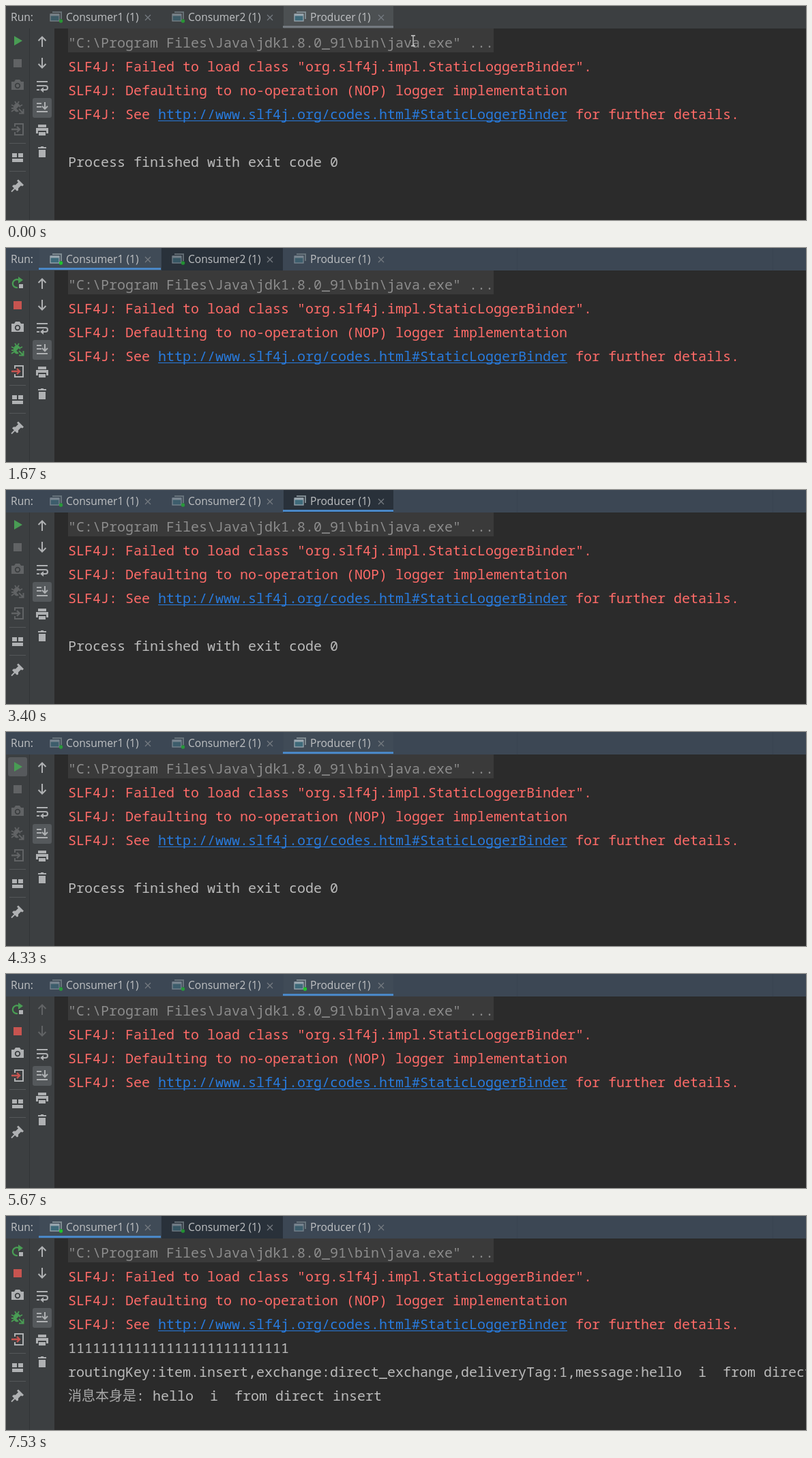
An HTML page for the animation above (8000 ms loop, 1173 px wide and 314 px high).

```html
<!DOCTYPE html>
<html lang="en">
<head>
<meta charset="utf-8">
<title>Run window</title>
<style>
  html, body { margin: 0; width: 100%; height: 100%; overflow: hidden; background: #2b2b2b; }
  svg { display: block; width: 1173px; height: 314px; }
  text { white-space: pre; }
  .mono { font: 20px "Noto Sans Mono", "Noto Sans CJK SC", "Noto Sans CJK", monospace; }
  .light { font-weight: 300; }
  .ui { font: 15.6px "Open Sans", "Noto Sans", sans-serif; fill: #bfc1c3; }
</style>
</head>
<body>
<svg id="stage" viewBox="0 0 1173 314"></svg>
<script>
const LOOP = 8000;
const GREY = '#afb1b3', OFF = '#616365', GREEN = '#499c54', RED = '#c75450';
const stage = document.getElementById('stage');

const rect = (x, y, w, h, fill, extra = '') =>
  `<rect x="${x}" y="${y}" width="${w}" height="${h}" fill="${fill}" ${extra}/>`;
const fillPath = (d, fill) => `<path d="${d}" fill="${fill}"/>`;
const line = (d, color, w = 2) => `<path d="${d}" fill="none" stroke="${color}" stroke-width="${w}"/>`;
const dot = (x, y, r, fill) => `<circle cx="${x}" cy="${y}" r="${r}" fill="${fill}"/>`;
const move = (x, y, body) => `<g transform="translate(${x} ${y})">${body}</g>`;
const escape = s => s.replace(/&/g, '&amp;').replace(/</g, '&lt;');
const mono = (row, s, fill, col = 0, style = '') =>
  `<text class="mono ${style}" x="${91 + col * 12}" y="${61 + row * 35}" fill="${fill}">${escape(s)}</text>`;

// Value of the last step that has begun at time t; steps are [start, value].
const step = (t, steps) => steps.reduce((v, [start, value]) => t >= start ? value : v, null);
const within = (t, ...spans) => spans.some(([a, b]) => t >= a && t < b);

// Icons are drawn around their centre.
const icons = {
  run: () => fillPath('M-5-8L7-1L-5 6Z', GREEN),
  rerun: () => line('M0 6A6 6 0 1 1 2-5', GREEN, 2.2) +
    fillPath('M1-10L8-5L1 0Z', GREEN) + rect(2, 1, 6, 6, GREY),
  stop: on => rect(-6, -6, 12, 12, on ? RED : OFF),
  camera: on => fillPath('M-9-5H-5L-3-8H3L5-5H9V7H-9Z', on ? GREY : OFF) +
    dot(0, 1, 4.2, '#3c3f41') + dot(0, 1, 2.4, on ? GREY : OFF),
  bug: on => {
    const c = on ? GREEN : OFF;
    return `<ellipse cx="-1" cy="0" rx="5" ry="6.5" fill="${c}"/>` +
      line('M-4-9L-2-6M2-9L0-6M-9-4L-5-2M7-4L3-2M-9 1H-5M-9 6L-5 3', c, 1.8) +
      line('M0 0L8 8', '#3c3f41', 5) + line('M2 2L8 8M8.5 2V8.5H2', c, 2);
  },
  exit: on => line('M-4-4V-8H8V8H-4V4', on ? GREY : OFF) +
    line('M-9 0H3M-1-4L3 0L-1 4', on ? RED : OFF, 2.4),
  layout: () => rect(-8, -6, 7, 6, GREY) + rect(1, -6, 7, 6, GREY) + rect(-8, 2, 16, 5, GREY),
  pin: () => fillPath('M1-9L9-1L7 1L5 0L1 4L1 7L-1 8L-8 1L-6-1L-3-1L1-5L-1-7Z', GREY) +
    line('M-4 4L-9 9', GREY, 1.8),
  up: c => line('M0 8V-6M-5.5-1L0-6.5L5.5-1', c),
  down: c => line('M0-8V6M-5.5 1L0 6.5L5.5 1', c),
  wrap: () => line('M-8-6H8M-8 0H5A3 3 0 0 1 5 6H0M-8 6H-4', GREY) + fillPath('M2 2V10L-3 6Z', GREY),
  end: () => line('M-8-6H-1M-8-1H-1M-8 6H8M4-8V2M0-2L4 2L8-2', GREY),
  print: () => rect(-6, -8, 12, 4, GREY) + fillPath('M-9-3H9V5H6V1H-6V5H-9Z', GREY) + rect(-5, 3, 10, 5, GREY),
  trash: () => fillPath('M-6-7H-2V-8H2V-7H6V-5H-6ZM-5-3H5V8H-5Z', GREY),
};

const tabs = [
  { name: 'Consumer1 (1)', x: 49, end: 227, icon: 64, close: 208 },
  { name: 'Consumer2 (1)', x: 228, end: 406, icon: 243, close: 387 },
  { name: 'Producer (1)', x: 407, end: 568, icon: 422, close: 550 },
];

function tabIcon(x, running, selected) {
  const body = line(`M${x + 4} 9H${x + 17}V19`, '#7f8b91', 2) +
    rect(x + 1, 12, 13, 10, '#3e6a7a', 'stroke="#9aa7b0" stroke-width="1.3"') +
    rect(x + 1, 11.5, 13, 3, '#9aa7b0') +
    (running ? dot(x + 16.5, 22, 2.7, '#1fc42f') : '');
  return `<g opacity="${selected ? 1 : 0.65}">${body}</g>`;
}

function header(s) {
  const blue = '#3c4754', grey = '#3c3f41', seam = '#384350', focused = s.focus === 2;
  let out = rect(0, 0, 1173, 33, focused ? blue : grey);
  if (s.focus === 1) out += rect(571, 0, 602, 33, blue);
  if (s.focus) out += rect(749, 0, 1, 33, seam) + rect(1124, 0, 1, 33, seam);
  out += `<text class="ui" x="7" y="22">Run:</text>`;
  tabs.forEach((tab, i) => {
    const selected = s.tab === i, hover = s.hover === i, w = tab.end - tab.x;
    const bg = hover ? (focused ? '#29313a' : '#2a2c2e') : selected ? (focused ? '#404b57' : '#4c5052') : '';
    if (bg) out += rect(tab.x, 0, w, 33, bg);
    if (selected) out += rect(tab.x - 1, 29, w + 1, 3, focused ? '#4a88c7' : '#747a80');
    out += tabIcon(tab.icon, i < 2 || s.running, selected);
    out += `<text class="ui" x="${tab.icon + 24}" y="22">${tab.name}</text>`;
    const hot = s.closeHot && i === 1;
    if (hot) out += dot(tab.close, 17, 7.5, '#868b90');
    out += move(tab.close, 17, line('M-4-4L4 4M4-4L-4 4', hot ? '#2b2f33' : '#747a80', 1.3));
  });
  return out;
}

function toolbar(s) {
  const live = s.tab < 2 || s.running;
  const items = s.starting ? ['stop', 'exit'] :
    s.running ? ['stop', 'camera', 'exit'] : ['stop', 'camera', 'bug', 'exit'];
  const itemY = i => Math.round(84 + i * 32.4);
  let out = rect(0, 33, 71, 281, '#3c3f41') + rect(34, 33, 1, 281, '#323537');
  if (s.runHot) out += rect(3, 37, 28, 28, '#56595c', 'rx="3"');
  out += move(17, 52, icons[live ? 'rerun' : 'run']());
  items.forEach((name, i) => { out += move(17, itemY(i), icons[name](live)); });
  const y = itemY(items.length - 1);
  for (const gap of [20, 61]) out += rect(5, y + gap, 24, 1, '#55585a');
  out += move(17, y + 41, icons.layout()) + move(17, y + 82.5, icons.pin());

  if (s.tab !== 1) out += rect(39, 135, 28, 29, '#55595c', 'rx="3"');
  const arrow = s.running ? OFF : GREY;
  ['up', 'down', 'wrap', 'end', 'print', 'trash'].forEach((name, i) => {
    out += move(53, Math.round(52 + i * 32.4), icons[name](arrow));
  });
  return out;
}

const command = String.raw`"C:\Program Files\Java\jdk1.8.0_91\bin\java.exe" `;
const link = 'http://www.slf4j.org/codes.html#StaticLoggerBinder';

function output(s) {
  const text = '#bbbbbb', error = '#ff6b68';
  let out = rect(71, 33, 1102, 281, '#2b2b2b');
  if (s.tab === 1) {
    out += mono(0, command + String.raw`"-javaagent:E:\IntelliJ IDEA 2020.2\lib\idea_rt.jar`, text);
  } else {
    out += rect(91, 33, 624, 35, '#3a3a3a') + mono(0, command + '...', '#8c8c8c');
  }
  if (!s.starting) {
    out += mono(1, 'SLF4J: Failed to load class "org.slf4j.impl.StaticLoggerBinder".', error) +
      mono(2, 'SLF4J: Defaulting to no-operation (NOP) logger implementation', error) +
      mono(3, 'SLF4J: See ', error) + mono(3, link, '#287bde', 11) +
      rect(223, 168, link.length * 12, 1, '#287bde') +
      mono(3, ' for further details.', error, 11 + link.length);
  }
  if (s.tab === 2 && !s.running) out += mono(5, 'Process finished with exit code 0', text);
  if (s.messages) {
    out += mono(4, '1'.repeat(27), text) +
      mono(5, 'routingKey:item.insert,exchange:direct_exchange,deliveryTag:1,message:hello  i  from direct insert', text) +
      mono(6, '消息本身是', '#a8a8a8', 0, 'light') +
      mono(6, ': hello  i  from direct insert', text, 100 / 12);
  }
  if (s.caret !== null) out += rect(91, 37 + s.caret * 35, 2, 29, '#c8c8c8');
  return out;
}

function pointer(t) {
  if (t < 70) return move(597, 51, line('M-3-7.5H3M-3 7.5H3M0-7.5V7.5', '#d0d0d0', 1.3));
  if (t < 330) {
    const n = step(t, [[70, 0], [130, 1], [200, 2], [270, 3]]);
    return move(541 - n * 87, 36 - n * 12,
      '<path d="M0 0V14L3 11L6 17L8 16L5.5 10H10Z" fill="#fff" stroke="#222"/>');
  }
  return within(t, [6270, 6870]) ? line('M560.5 18V21L559.5 23', '#c8ccd0', 1.2) : '';
}

function stateAt(t) {
  return {
    focus: step(t, [[0, 0], [1130, 1], [1200, 2]]),
    tab: step(t, [[0, 2], [1070, 0], [2200, 1], [3330, 2], [7070, 0]]),
    hover: step(t, [[0, -1], [800, 0], [1600, 1], [2730, 2], [3730, -1], [4530, 0], [4670, 1],
      [4800, -1], [6200, 0], [7400, 1]]),
    closeHot: within(t, [2670, 2730]),
    runHot: within(t, [3870, 4400]),
    running: within(t, [5330, 6070]),
    starting: within(t, [5330, 5600]),
    messages: t >= 7070,
    caret: within(t, [2270, 2870]) ? 0 :
      within(t, [3530, 4000], [4600, 5130], [6870, 7070]) ? 6 :
      within(t, [7130, 7530]) ? 7 : null,
  };
}

let shown = '';
function render(t) {
  const s = stateAt(t);
  const body = output(s) + toolbar(s) + header(s) + pointer(t);
  if (body !== shown) stage.innerHTML = shown = body;
}

const start = performance.now();
function tick() {
  render((performance.now() - start) % LOOP);
  requestAnimationFrame(tick);
}
tick();
</script>
</body>
</html>
```
